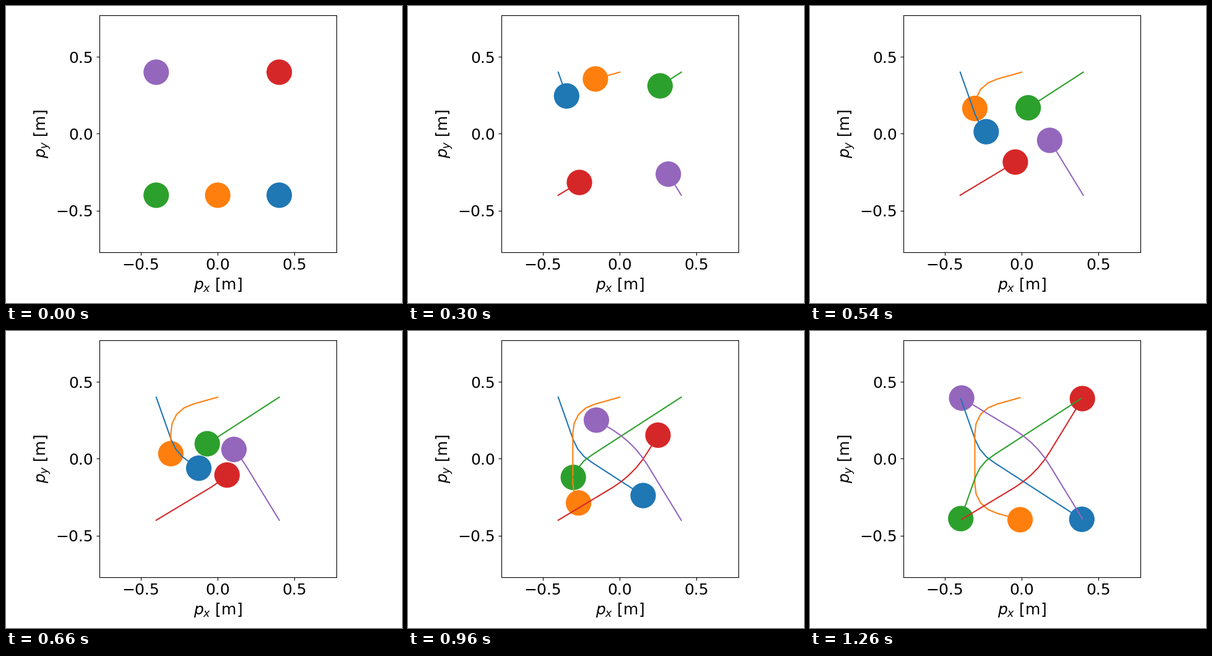
A matplotlib script for the animation above (1320 ms loop, 640x480 px).

```python
import numpy as np
import matplotlib.pyplot as plt
from matplotlib.animation import FuncAnimation

W, H, DPI = 640, 480, 100
FRAMES, INTERVAL = 22, 60
LAST = FRAMES - 1      # final step of a run
RAMP = 3               # steps spent speeding up and slowing down
TRAIL = 20             # positions kept in a trail
RADIUS, LIMIT = 0.08, 0.77
LEFT, BOTTOM, SIDE = 150.83, 82.28, 382.72   # plot area in pixels


def travel(step):
    """Share of the route covered: constant acceleration, cruise, braking."""
    left = LAST - step
    if step < RAMP:
        done = step ** 2 / (2 * RAMP)
    elif left < RAMP:
        done = LAST - RAMP - left ** 2 / (2 * RAMP)
    else:
        done = step - RAMP / 2
    return done / (LAST - RAMP)


def rounded(points, cut):
    """Polyline whose corners are replaced by quadratic curves."""
    points = np.array(points, float)
    t = np.linspace(0, 1, 40)[:, None]
    parts = [points[:1]]
    for before, corner, after in zip(points, points[1:], points[2:]):
        a, b = (corner + cut * (p - corner) / np.hypot(*(p - corner))
                for p in (before, after))
        parts.append((1 - t) ** 2 * a + 2 * t * (1 - t) * corner + t ** 2 * b)
    return np.vstack(parts + [points[-1:]])


def route(points, cut):
    """Position at every step along a rounded path."""
    curve = rounded(points, cut)
    length = np.append(0, np.cumsum(np.hypot(*np.diff(curve, axis=0).T)))
    done = [travel(k) * length[-1] for k in range(FRAMES)]
    return np.column_stack([np.interp(done, length, c) for c in curve.T])


def mirrored(positions):
    """The same route run backwards and flipped top to bottom."""
    return positions[::-1] * [1, -1]


blue = route([(-0.4, 0.4), (-0.271, 0.034), (0.4, -0.4)], 0.093)
orange = route([(0, 0.4), (-0.305, 0.315), (-0.305, -0.315), (0, -0.4)], 0.152)
purple = route([(0.4, -0.4), (0.091, 0.105), (-0.4, 0.4)], 0.17)
routes = [blue, orange, mirrored(blue), mirrored(purple), purple]

fig = plt.figure(figsize=(W / DPI, H / DPI), dpi=DPI)
ax = fig.add_axes([LEFT / W, BOTTOM / H, SIDE / W, SIDE / H])
ax.set(xlim=(-LIMIT, LIMIT), ylim=(-LIMIT, LIMIT),
       xticks=[-0.5, 0, 0.5], yticks=[-0.5, 0, 0.5])
ax.tick_params(labelsize=18)
ax.set_xlabel("$p_x$ [m]", fontsize=18)
ax.set_ylabel("$p_y$ [m]", fontsize=18)

discs, trails = [], []
for i, positions in enumerate(routes):
    color = f"C{i}"
    discs.append(ax.add_patch(plt.Circle(positions[0], RADIUS, color=color)))
    trails.append(ax.plot([], [], color=color, lw=1.5)[0])


def draw(frame):
    # The loop opens on the finished pose, then the run starts over.
    step = (frame - 1) % FRAMES
    first = max(0, step + 1 - TRAIL) if frame else step
    for positions, disc, trail in zip(routes, discs, trails):
        disc.center = positions[step]
        trail.set_data(*positions[first:step + 1].T)
    return discs + trails


anim = FuncAnimation(fig, draw, frames=FRAMES, interval=INTERVAL,
                     init_func=lambda: draw(0), repeat=True, repeat_delay=0)
plt.show()
```
